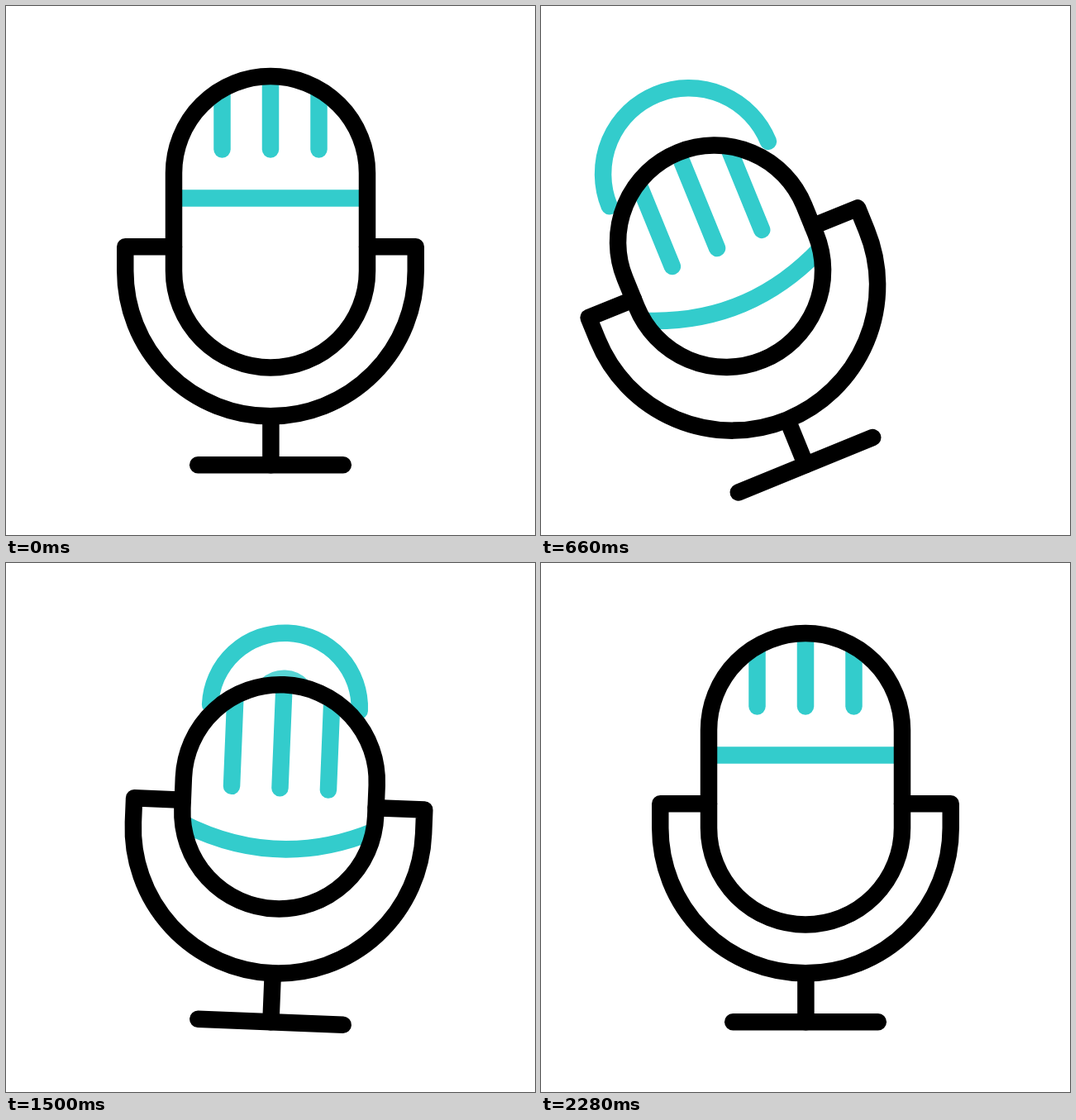
Write an HTML page with a canvas that moves like this. It is 640 px wide and 640 px high and loops after 2.4 s.

```html
<!DOCTYPE html>
<html lang="en">
<head>
<meta charset="utf-8">
<title>Microphone</title>
<style>
  html, body { margin: 0; width: 100%; height: 100%; overflow: hidden; background: #fff; }
  canvas { display: block; width: 100vmin; height: 100vmin; }
</style>
</head>
<body>
<canvas id="stage" width="640" height="640"></canvas>
<script>
const ctx = document.getElementById('stage').getContext('2d');
const TEAL = '#33cccc', BLACK = '#000';
const LOOP = 2400, PIVOT_Y = 555.25, CX = 320, RADIUS = 117;

// Keyframes: [time in ms, value]
const SWING = [[0, 0], [583, -25], [1042, 11.65], [1230, -6], [1417, 3], [1690, 0]];
const SQUASH = [[0, 0], [500, 1], [1750, 1], [2250, 0]];
const LIFT = [[0, 0], [450, 1], [1750, 1], [2160, 0]];
const WAVE_STARTS = [0, 451, 911, 1250];
const WAVE_LIFE = 1030;

const clamp = x => Math.min(1, Math.max(0, x));
const smooth = x => x * x * (3 - 2 * x);

function sample(keys, t) {
  const i = keys.findIndex(k => k[0] > t);
  if (i < 0) return keys[keys.length - 1][1];
  const [t0, a] = keys[i - 1], [t1, b] = keys[i];
  return a + (b - a) * smooth((t - t0) / (t1 - t0));
}

function stroke(color, build) {
  ctx.strokeStyle = color;
  ctx.beginPath();
  build();
  ctx.stroke();
}

function line(color, ...points) {
  stroke(color, () => points.forEach(([x, y]) => ctx.lineTo(x, y)));
}

// A sound wave grows from inside the head, fading in and out.
function drawWave(age) {
  if (age < 0 || age >= WAVE_LIFE) return;
  const r = 11 + 140 * smooth(clamp(age / 1083));
  ctx.globalAlpha = clamp((age - 210) / 50) * clamp((WAVE_LIFE - age) / 145);
  stroke(TEAL, () => ctx.arc(CX + r * 0.022, 167 + r * 0.085, r, Math.PI, 0));
  ctx.globalAlpha = 1;
}

function drawHead(squash, lift) {
  const top = 202 + 62 * squash, bottom = 320.5 - 19.3 * lift;
  const capsule = new Path2D();
  capsule.arc(CX, top, RADIUS, Math.PI, 0);
  capsule.arc(CX, bottom, RADIUS, 0, Math.PI);
  capsule.closePath();
  ctx.fillStyle = '#fff';
  ctx.fill(capsule);

  ctx.save();
  ctx.clip(capsule);
  for (const dx of [-58.5, 0, 58.5])
    line(TEAL, [CX + dx, 60], [CX + dx, 173.5 + 98.5 * squash]);
  const side = 232.5 + 86.5 * squash;
  stroke(TEAL, () => {
    ctx.moveTo(CX - RADIUS, side);
    ctx.quadraticCurveTo(CX, side + 54 * squash, CX + RADIUS, side);
  });
  ctx.restore();

  ctx.strokeStyle = BLACK;
  ctx.stroke(capsule);
}

function drawStand() {
  stroke(BLACK, () => {
    ctx.moveTo(203, 291.2);
    ctx.lineTo(144.25, 291.2);
    ctx.arc(CX, 320.5, 175.75, Math.PI, 0, true);
    ctx.lineTo(495.75, 291.2);
    ctx.lineTo(437, 291.2);
  });
  line(BLACK, [320.4, 497], [320.4, PIVOT_Y]);
  line(BLACK, [232.2, PIVOT_Y], [407.8, PIVOT_Y]);
}

function draw(now) {
  const t = now % LOOP;
  ctx.clearRect(0, 0, 640, 640);
  ctx.save();
  ctx.lineWidth = 20.5;
  ctx.lineCap = ctx.lineJoin = 'round';
  ctx.translate(CX, PIVOT_Y);
  ctx.rotate(sample(SWING, t) * Math.PI / 180);
  ctx.translate(-CX, -PIVOT_Y);
  WAVE_STARTS.forEach(start => drawWave(t - start));
  drawHead(sample(SQUASH, t), sample(LIFT, t));
  drawStand();
  ctx.restore();
  requestAnimationFrame(draw);
}
requestAnimationFrame(draw);
</script>
</body>
</html>
```
